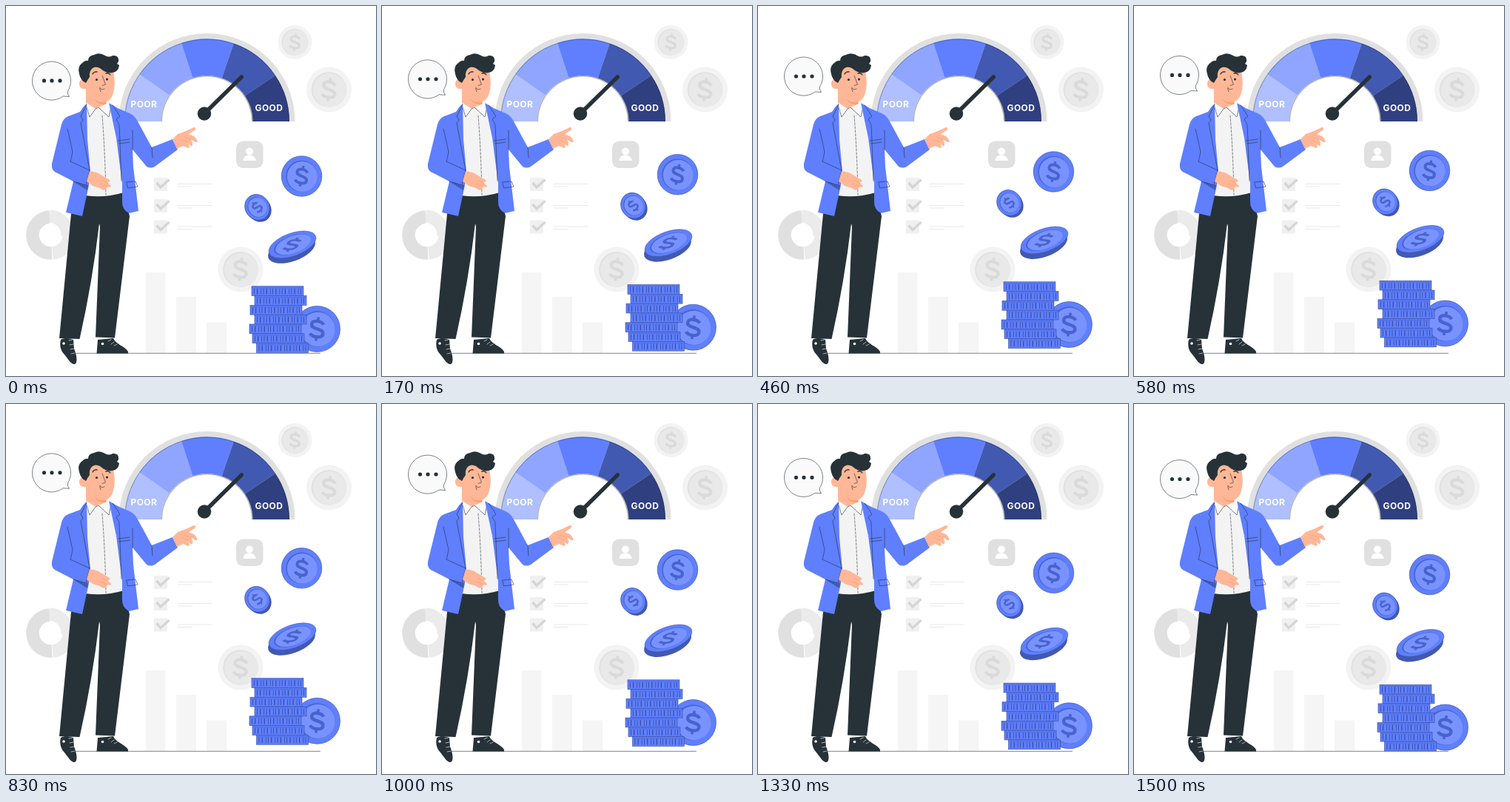
An HTML page for the animation above (1.54 s loop, 500x500 px).

```html
<!DOCTYPE html>
<html lang="en">
<head>
<meta charset="utf-8">
<title>Credit score</title>
<style>
  html, body { margin: 0; height: 100%; overflow: hidden; background: #fff; }
  svg { display: block; width: 100vw; height: 100vh; }
  .line { fill: none; stroke: #263238; stroke-width: .6; stroke-linecap: round; stroke-linejoin: round; }
  .bold { stroke-width: 1.3; }
  .white { stroke: #fff; }
  .fold { stroke: #ff9a6c; }
  .label { font: 700 12px Inter, "Open Sans", sans-serif; letter-spacing: .4px; fill: #fff; }
  .skin { fill: #ffb797; }
  .ink { fill: #263238; }
  .blue { fill: #5f7fff; }
</style>
</head>
<body>
<svg viewBox="0 0 500 500">
  <defs>
    <g id="dollar" fill="none" stroke="currentColor">
      <path stroke-width="4.4" d="M8-6.5C5-11.5-8-12.5-8-5.5C-8 2 8.500-2 8.500 5.500C8.500 12.500-5 12-9 7"/>
      <path stroke-width="3.6" d="M0-16V-10M0 10V16"/>
    </g>
  </defs>

  <g id="greyCoins"></g>

  <g fill="none" stroke-width="17.5">
    <path stroke="#e0e0e0" d="M62 334A24.5 24.5 0 0 1 59 285"/>
    <path stroke="#ebebeb" d="M59 284A25 25 0 0 1 83 312M85 312A24.5 24.5 0 0 1 63 334"/>
  </g>

  <path fill="#f5f5f5" d="M189 360h26.5v109h-26.5zM230 393h27v76h-27zM271 427.5h27v41.5h-27z"/>
  <g id="checks"></g>

  <rect x="311" y="182.5" width="36.500" height="36.500" rx="9.500" fill="#e0e0e0"/>
  <path fill="#fff" d="M320.500 209C320.500 199 337.500 199 337.500 209Z"/>
  <circle cx="329" cy="196.500" r="5" fill="#fff"/>

  <path fill="#e0e0e0" d="M152.500 156a119 119 0 0 1 238 0z"/>
  <g id="gauge"></g>
  <path fill="#e6e6e6" d="M209.500 156a62 62 0 0 1 124 0z"/>
  <path fill="#fff" d="M211.500 156a60 60 0 0 1 120 0v1h-120z"/>
  <path class="line" opacity=".6" d="M160.500 156a111 111 0 0 1 222 0M210 156a61.500 61.500 0 0 1 123 0"/>
  <text class="label" x="168.500" y="136.500">POOR</text>
  <text class="label" x="336.500" y="142">GOOD</text>
  <circle class="ink" cx="268" cy="145.500" r="9.200"/>
  <path d="M268 145.500L318.300 95.800" stroke="#263238" stroke-width="5.400" stroke-linecap="round"/>

  <path class="line" d="M92 469.300H424.500"/>

  <g id="man">
    <path class="ink" d="M104 256L159 252L167 284L147 448.500L121 447.500L127 298L126 294Q117 372 99.500 450L72 449L88 281Z"/>
    <path class="ink" d="M74 451C79 448 86 449 91 451L92 463C96 473 97 482 93 484C88 485 84 477 79 471C74 466 72 459 74 451Z"/>
    <path class="ink" d="M124 451L145 449C148 457 161 460 165 467V469.500H122.500Z"/>
    <path class="line white" d="M85 452l5-1M86 458l5-1M87 464l5-1M88 470l5-1M138 453l4-2M142 457l4-3M146 459l4-2"/>
    <circle fill="#fff" cx="78" cy="456" r="1.800"/>
    <circle fill="#fff" cx="130.500" cy="456.500" r="1.800"/>

    <path fill="#f3f3f3" d="M108 134L121 132L143 137L153 176L159 252Q133 260 107 256L110 200Z"/>
    <path class="line" stroke-dasharray="3 2" d="M130 148Q134 200 135 255"/>

    <path class="skin" d="M108 112V132L121 139L136 133L135 124Z"/>
    <path fill="#ff9a6c" d="M118 124Q125 132 135 130L135.500 133Q124 134 118 124Z"/>
    <path fill="#fafafa" d="M109 131L107 138L113 150L121 139ZM121 139L125 136L139 150L143 137L138 131Z"/>
    <path class="line" d="M108 134L113 150L121 139L125 137L139 150L142 136"/>

    <path class="blue" d="M109 132Q103 137 100 143L84 149Q77 152 75 160L62 213Q61 221 66 224L91 237L81 279L103 284L112 242L114 224L110 180Z"/>
    <path class="blue" d="M139 131L151 138L167 145Q174 148 178 156L197 191L225 180L232 194L201 217Q195 220 190 217L171 194L172 217L179 277L166 280Q157 275 157 265L157 240L149 178Z"/>
    <path class="line" d="M109 133L101 149L104 154L101 158L113 222M144 134L154 149L149 153L153 160L156 236M83 166L90 197L87 211M171 194V168M197 191L198 205M152 182L167 180M153 186L167 184M163 238L175 237L178 244L165 246Z"/>
    <path fill="#4259b2" d="M91 237L111 242L110 249Z"/>
    <path class="blue" d="M66 207L88 210L113 222L108 243L66 224Q61 220 66 207Z"/>
    <path class="line" d="M87 210L113 222L108 242L91 237"/>
    <path class="skin" d="M113 223L123 225L133 231L140 235Q142 238 137 238L142 243Q142 246 137 244L135 248Q131 250 127 246L117 243L109 237Z"/>
    <path class="line fold" d="M130 236L137 238M128 240L137 244"/>
    <path class="skin" d="M225 180L232 173L243 169L254 164Q258 164 255 168L247 173L254 176Q260 182 258 184Q256 185 250 180Q254 187 251 189Q249 190 245 184Q250 191 246 192L239 189L231 193Z"/>
    <path class="line fold" d="M241 177L250 180M239 181L246 184"/>

    <path class="skin" d="M110 84Q140 78 145 88Q148 103 146 113Q143 129 133 130Q120 130 112 116L108 112Q99 113 99 105Q99 98 108 100Z"/>
    <path class="ink" d="M108 104Q101 101 99 92Q96 82 103 77Q107 73 111 74Q111 67 119 66Q126 62 134 67Q139 70 144 67Q153 66 152 75L150 78L153 80Q152 89 144 90Q136 92 127 84Q121 81 117 84Q112 88 113 96Q110 100 108 104Z"/>
    <circle class="ink" cx="122.500" cy="99.500" r="1.600"/>
    <circle class="ink" cx="136.500" cy="99" r="1.600"/>
    <path class="line" d="M130 94L134.500 106L130 107.500M127 111Q129 114 133 112M127 110Q126 113 128 116"/>
    <path class="line bold" d="M117 92Q119 88 123 89M135 91Q139 90 141 93"/>
  </g>

  <g id="floating">
    <path fill="#fafafa" stroke="#263238" stroke-width=".6" d="M83.500 115A26 26 0 1 0 77 122L85.500 122.500Q82.500 119 83.500 115Z"/>
    <path stroke="#263238" stroke-width="5.200" stroke-linecap="round" d="M51.500 101h0M62 101h0M73 101h0"/>
  </g>
</svg>
<script>
const byId = id => document.getElementById(id);
const grey = { rim: '#f3f3f3', shade: '#e0e0e0', face: '#e9e9e9', ink: '#dadada', edge: 'none' };
const blue = { rim: '#5f7fff', shade: '#4a63cc', face: '#7893ff', ink: '#4a63cc', edge: '#354a9c' };

// Coin face at the origin; the transform places it and ry flattens it.
const coin = (place, r, c, tilt = 6, ry = 1) => `
  <g transform="${place} scale(1 ${ry})" color="${c.ink}">
    <circle r="${r}" fill="${c.rim}" stroke="${c.edge}" stroke-width=".6"/>
    <circle r="${r * .78}" fill="${c.shade}"/>
    <circle cx="${r * .03}" cy="${r * .02}" r="${r * .75}" fill="${c.face}"/>
    <use href="#dollar" transform="rotate(${tilt}) scale(${r / 31})"/>
  </g>`;

const layer = (x, i) => {
  const y = 378.8 + i * 12.8;
  return `
    <rect x="${x}" y="${y}" width="70" height="12.8" class="blue" stroke="#354a9c" stroke-width=".6"/>
    <path d="M${x + 1} ${y + 2}h68" stroke="#4259b2" stroke-width=".5"/>
    <path d="M${x + 3} ${y + 6.9}h65" stroke="#34479a" stroke-width="8" stroke-dasharray=".8 3.3 1.1 4.1 .7 2.6"/>`;
};

const center = { x: 271.5, y: 156 };
const polar = (r, degrees) => {
  const a = degrees * Math.PI / 180;
  return `${center.x - r * Math.cos(a)} ${center.y - r * Math.sin(a)}`;
};

byId('greyCoins').innerHTML =
  coin('translate(390.5 49)', 23, grey) +
  coin('translate(436.5 113)', 30.5, grey) +
  coin('translate(317 356)', 30.5, grey);

byId('checks').innerHTML = [232, 261, 289.5].map(y => `
  <rect x="200" y="${y}" width="18" height="18" fill="#f0f0f0"/>
  <path d="M203.5 ${y + 7}L209 ${y + 13}L220.5 ${y + 2.5}" fill="none" stroke="#d6d6d6" stroke-width="3.4"/>
  <path d="M232 ${y + 8.5}h46M232 ${y + 12}h20" stroke="#e3e3e3" stroke-width=".8"/>`).join('');

// Equal sectors, the outer two cut off by the base line.
const edge = i => Math.min(180, Math.max(0, 37 * i - 2));
byId('gauge').innerHTML = ['#afbfff', '#8fa5ff', '#5f7fff', '#4259b2', '#2f3f7f'].map((color, i) => `
  <path fill="${color}" d="M${polar(61, edge(i))}L${polar(111.5, edge(i))}
    A111.5 111.5 0 0 1 ${polar(111.5, edge(i + 1))}L${polar(61, edge(i + 1))}Z"/>`).join('');

byId('floating').innerHTML +=
  coin('translate(399.5 230)', 27.3, blue, 10) +
  '<ellipse cx="342" cy="274.5" rx="16" ry="18" transform="rotate(-35 342 274.5)" fill="#4259b2"/>' +
  coin('translate(339.5 272) rotate(-35)', 16.3, blue, -12, 1.1) +
  '<ellipse cx="386" cy="329" rx="33.5" ry="16" transform="rotate(-20 386 329)" fill="#4259b2"/>' +
  coin('translate(387 322.5) rotate(-20)', 33.5, blue, 35, .46) +
  coin('translate(420.5 436.5)', 31, blue) +
  [332, 336, 330, 336, 329, 333, 338.5].map(layer).join('');

// Triangle wave: everything that floats rises 10 px and sinks back.
const period = 1540, rise = 10;
function draw(now) {
  const phase = (now + 40) % period / period;
  const lift = rise * (1 - Math.abs(1 - 2 * phase));
  byId('floating').setAttribute('transform', `translate(0 ${0.5 - lift})`);
  requestAnimationFrame(draw);
}
draw(0);
</script>
</body>
</html>
```
